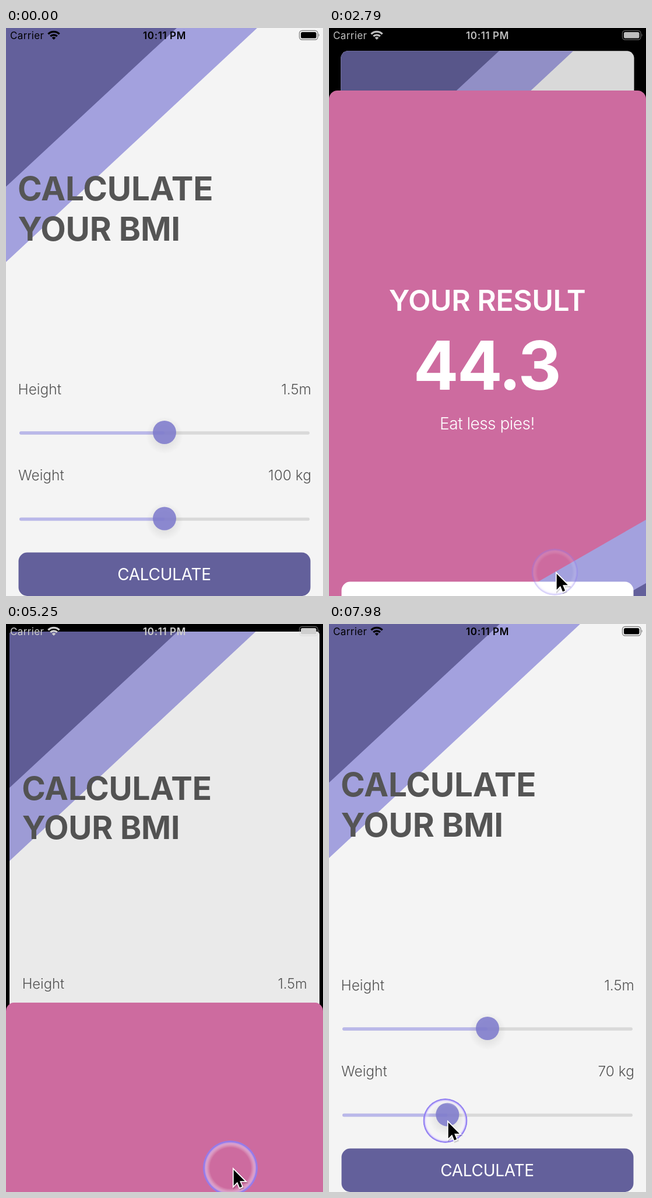
An HTML page for the animation above (8 s loop, 544 px wide and 972 px high).

```html
<!DOCTYPE html>
<html lang="en">
<head>
<meta charset="utf-8">
<title>BMI calculator</title>
<style>
  html, body { margin: 0; width: 100%; height: 100%; overflow: hidden; background: #000; }
  svg { display: block; width: 100%; height: 100%; }
  text { font-family: Inter, Roboto, sans-serif; white-space: pre; }
  .mid { text-anchor: middle; }
  .end { text-anchor: end; }
  .title { font-size: 56.5px; font-weight: 700; letter-spacing: -.2px; fill: #555; }
  .label { font-size: 24.5px; font-weight: 300; fill: #555; }
  .button { font-size: 28px; font-weight: 400; letter-spacing: -.3px; text-anchor: middle; }
  .status { font-size: 17px; }
</style>
</head>
<body>
<svg viewBox="0 0 544 972" preserveAspectRatio="none">
  <defs>
    <clipPath id="homeClip"><rect id="homeFrame"/></clipPath>
    <clipPath id="sheetClip"><rect y="57" width="544" height="960" rx="14.5"/></clipPath>
    <radialGradient id="shade">
      <stop offset=".5" stop-opacity=".07"/>
      <stop offset="1" stop-opacity="0"/>
    </radialGradient>
    <radialGradient id="glow">
      <stop offset=".74" stop-color="#fff" stop-opacity="0"/>
      <stop offset=".86" stop-color="#f4ecff" stop-opacity=".4"/>
      <stop offset=".91" stop-color="#cfc0ff" stop-opacity=".6"/>
      <stop offset=".95" stop-color="#8f7cf2" stop-opacity=".95"/>
      <stop offset=".99" stop-color="#8f7cf2" stop-opacity=".95"/>
      <stop offset="1" stop-color="#9484f0" stop-opacity=".6"/>
    </radialGradient>
    <g id="knob">
      <circle cy="5" r="32" fill="url(#shade)"/>
      <circle r="20" fill="#7f7bcd" fill-opacity=".87"/>
    </g>
  </defs>
  <rect width="544" height="972"/>

  <g id="home" clip-path="url(#homeClip)">
    <rect x="-5" y="-5" width="554" height="982" fill="#f4f4f4"/>
    <path d="M-5 -5H436.4L-5 405.2Z" fill="#a3a1de"/>
    <path d="M-5 -5H298.4L-5 276.2Z" fill="#63609b"/>
    <text class="title" x="20" y="294.5">CALCULATE</text>
    <text class="title" x="20.5" y="364">YOUR BMI</text>

    <text class="label" x="20.5" y="627">Height</text>
    <text class="label end" x="524" y="627">1.5m</text>
    <rect x="23" y="690.2" width="498" height="5.6" rx="2.8" fill="#d9d9d9"/>
    <rect x="23" y="690.2" width="249" height="5.6" rx="2.8" fill="#bab8e9"/>
    <use href="#knob" x="272" y="692"/>

    <text class="label" x="21" y="774">Weight</text>
    <text class="label end" x="524" y="774" id="weight">100 kg</text>
    <rect x="23" y="837.7" width="498" height="5.6" rx="2.8" fill="#d9d9d9"/>
    <rect id="fill" x="23" y="837.7" width="249" height="5.6" rx="2.8" fill="#bab8e9"/>
    <use id="thumb" href="#knob" x="272" y="839.5"/>

    <rect x="21.5" y="897.5" width="501" height="74.5" rx="15" fill="#63609b"/>
    <text class="button" id="calc" x="271.5" y="945" fill="#fff">CALCULATE</text>
    <rect id="dim" x="-5" y="-5" width="554" height="982"/>
  </g>

  <g id="sheet">
    <g clip-path="url(#sheetClip)">
      <rect y="57" width="544" height="960" fill="#cd6b9f"/>
      <path d="M544 791.5V972H229Z" fill="#a3a1de"/>
      <path d="M544 900V972H418Z" fill="#63609b"/>
    </g>
    <g fill="#fff">
      <text class="mid" x="271.5" y="434" font-size="50" font-weight="600" letter-spacing="-.5">YOUR RESULT</text>
      <text class="mid" x="270.5" y="569.5" font-size="115" font-weight="700" letter-spacing="-2.5">44.3</text>
      <text class="mid" x="271.5" y="637" font-size="28" font-weight="300" letter-spacing="-.5">Eat less pies!</text>
      <rect x="21.5" y="897.5" width="501" height="74.5" rx="15"/>
    </g>
    <text class="button" id="recalc" x="272" y="945" fill="#7470cb">RECALCULATE</text>
  </g>

  <g id="status">
    <text class="status" x="7" y="19" letter-spacing=".4">Carrier</text>
    <text class="status mid" x="272" y="19" font-weight="600" letter-spacing=".6">10:11 PM</text>
    <path d="M82 20L78.7 16.7A4.7 4.7 0 0 1 85.3 16.7Z"/>
    <g fill="none" stroke="currentColor" stroke-width="3.3">
      <path d="M76.2 14.2A8.2 8.2 0 0 1 87.8 14.2"/>
      <path d="M72.4 10.4A13.6 13.6 0 0 1 91.6 10.4"/>
    </g>
    <rect x="503.5" y="4.5" width="31.5" height="15.5" rx="4.5" fill="none" stroke="currentColor" stroke-width="1.4" opacity=".45"/>
    <rect x="506" y="7" width="26.5" height="10.5" rx="2.6"/>
    <path d="M536.5 9.5Q539 12.2 536.5 15Z" opacity=".45"/>
  </g>

  <circle id="ring" fill="url(#glow)"/>
  <g id="cursor">
    <path d="M3 6V33.2L9.4 26.8L13.4 36.4L17.4 34.8L13.4 25.2H22.2Z" opacity=".15" stroke="#000" stroke-width="4"/>
    <path d="M1.7 4V31.2L8.1 24.8L12.1 34.4L16.1 32.8L12.1 23.2H20.9Z" fill="#fff" stroke="#fff" stroke-width="3.5"/>
    <path d="M1.7 4V31.2L8.1 24.8L12.1 34.4L16.1 32.8L12.1 23.2H20.9Z"/>
  </g>
</svg>
<script>
const LOOP = 8000, STEP = 80;
const BURSTS = [0, 500, 2390, 4930, 6700];   // the screen refreshes in steps from these times
const SHOW = 2556, HIDE = 5151.5;            // sheet transitions
const PRESS = [2390, 5010], DRAG = 6700;

// time, x, y of the pointer tip
const POINTER = [
  [1140, 389, 930], [5650, 389, 930], [5730, 367, 926], [6050, 314, 878],
  [6210, 271, 857], [6290, 271, 857], [6370, 271, 854], [6860, 271, 853],
  [7100, 254, 852], [7180, 254, 852], [7980, 203, 849]
];
// time since press, radius, opacity, x offset
const TAP = [[0, 43, 1, -2.5], [80, 39, 1, -3], [160, 39, 1, -3], [240, 47, .95, -4], [400, 40, .35, -1.5], [500, 39, 0, -1.5]];
const HOLD = [[0, 45, 1, -3], [160, 38, 1, -3.5]];

const $ = id => document.getElementById(id);
const set = (id, attrs) => { for (const k in attrs) $(id).setAttribute(k, attrs[k]); };
const clamp = v => Math.min(1, Math.max(0, v));
const mix = (a, b, k) => a + (b - a) * k;
const smooth = v => { v = clamp(v); return v * v * (3 - 2 * v); };

// cubic-bezier(.32, .72, 0, 1)
function settle(x) {
  if (x <= 0) return 0;
  if (x >= 1) return 1;
  let lo = 0, hi = 1;
  for (let i = 0; i < 24; i++) {
    const u = (lo + hi) / 2;
    if (.96 * u * (1 - u) ** 2 + u ** 3 < x) lo = u; else hi = u;
  }
  return 2.16 * lo * (1 - lo) ** 2 + 3 * lo * lo * (1 - lo) + lo ** 3;
}

function track(keys, t) {
  if (t <= keys[0][0]) return keys[0].slice(1);
  const i = keys.findIndex(k => k[0] > t);
  if (i < 0) return keys[keys.length - 1].slice(1);
  const a = keys[i - 1], b = keys[i], k = (t - a[0]) / (b[0] - a[0]);
  return a.slice(1).map((v, n) => mix(v, b[n + 1], k));
}

function pointerAt(t) {
  if (t >= 1140) return track(POINTER, t);
  const k = 1 - (1 - clamp((t - 500) / 640)) ** 2;
  return [mix(536, 389, k), mix(917, 930, k)];
}

function ringAt(t) {
  if (t >= DRAG) return track(HOLD, t - DRAG);
  const start = PRESS.find(s => t >= s && t < s + 500);
  return start ? track(TAP, t - start) : [0, 0, 0];
}

// label dims at once on touch and fades back on release
const labelAlpha = (t, press) => t < press ? 1 : mix(.27, 1, clamp((t - press - 160) / 250));

function draw(time) {
  const from = BURSTS.filter(b => b <= time).pop();
  const t = from + Math.floor((time - from) / STEP) * STEP;

  const p = settle((t - SHOW) / 500) - settle((t - HIDE) / 500);
  const s = 1 - .081 * p, bleed = 8 * p * (1 - p);
  set("home", { transform: `translate(${272 * (1 - s)} ${42 * p}) scale(${s})` });
  set("homeFrame", { x: -bleed, y: -bleed, width: 544 + 2 * bleed, height: 972 + 2 * bleed, rx: 14 * p });
  set("dim", { opacity: .115 * p });
  set("sheet", { transform: `translate(0 ${915 * (1 - p)})`, visibility: p > 0 ? "visible" : "hidden" });

  const tone = Math.round(255 * (smooth((t - SHOW) / 350) - smooth((t - HIDE) / 350)));
  const ink = `rgb(${tone},${tone},${tone})`;
  set("status", { fill: ink, color: ink });
  set("calc", { opacity: labelAlpha(t, PRESS[0]) });
  set("recalc", { opacity: labelAlpha(t, PRESS[1]) });

  const [x, y] = pointerAt(t);
  set("cursor", { transform: `translate(${x} ${y})`, visibility: t < 500 ? "hidden" : "visible" });
  const [r, alpha, dx] = ringAt(t);
  set("ring", { cx: x + dx, cy: y + 1, r, opacity: alpha });

  const kg = t < DRAG ? 100 : Math.round(100 - (271.5 - x) / 2.29);
  const thumb = 43 + 2.29 * kg;
  $("weight").textContent = kg + " kg";
  set("thumb", { x: thumb });
  set("fill", { width: thumb - 23 });
}

const begin = performance.now();
function frame() {
  draw((performance.now() - begin) % LOOP);
  requestAnimationFrame(frame);
}
frame();
</script>
</body>
</html>
```
